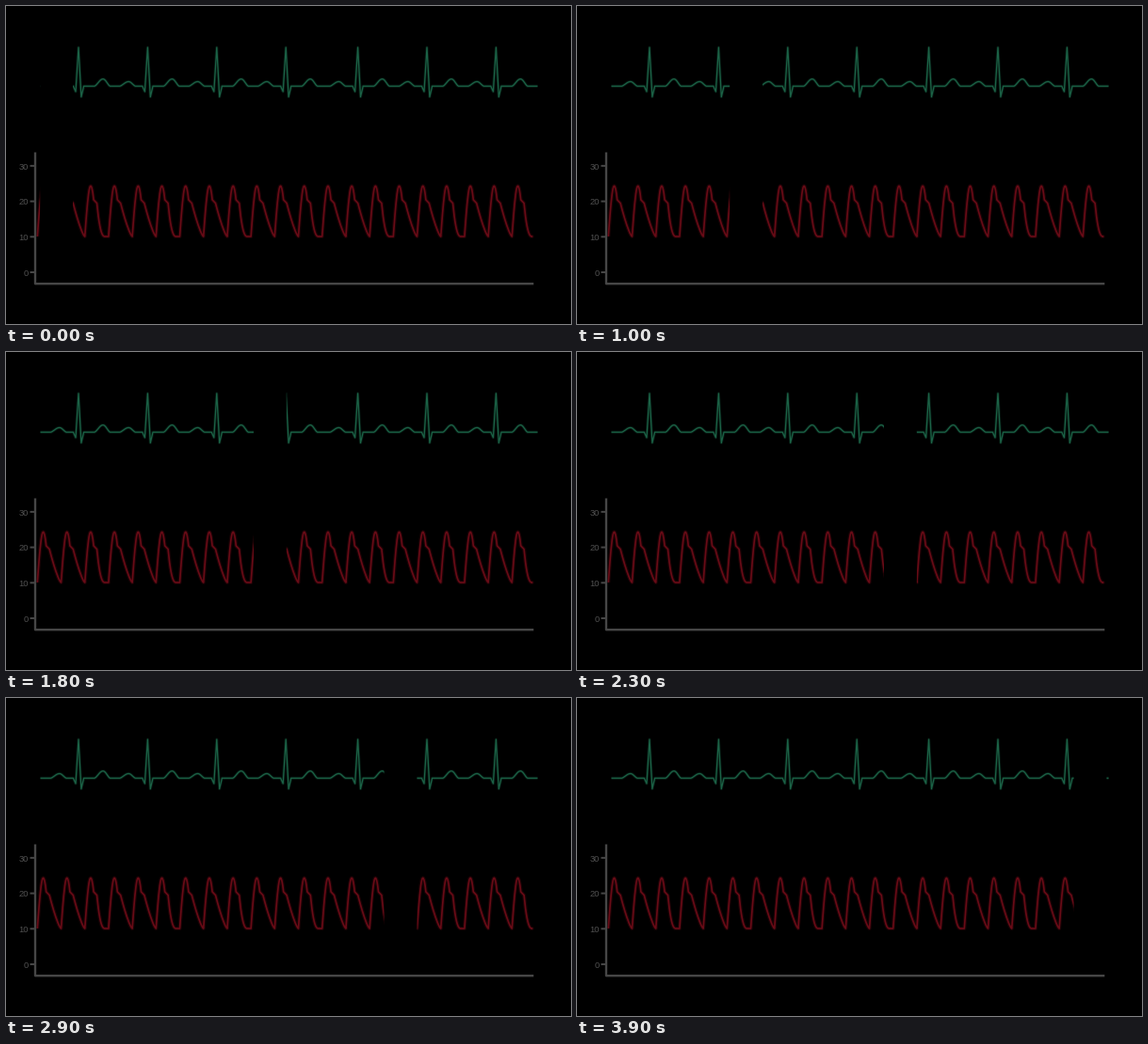
These frames come from a looping animation (600x338 px, 4 s). A matplotlib script:

```python
import numpy as np
import matplotlib.pyplot as plt
from matplotlib.animation import FuncAnimation
from matplotlib.patches import Rectangle

W, H, DPI = 600, 338, 100
PX = 72 / DPI
FRAMES, INTERVAL = 40, 100
GAP_START, GAP_STEP, GAP_WIDTH = 36.2, 12.6, 34.8

GREEN, RED, GREY, LABEL = "#1b6246", "#680b16", "#464646", "#505050"

ECG_BASE, ECG_START, ECG_END = 85.2, 36.5, 564.5
FOOT, TOP, NOTCH = 245, 191.3, 206
BEAT, BEATS, PRESSURE_END = 25.2, 21, 558.5


def wave(start, peak, end, height):
    """Rounded ECG wave that may rise and fall at different rates."""
    u = np.linspace(-1, 1, 17)
    x = peak + u * np.where(u < 0, peak - start, end - peak)
    y = ECG_BASE - height * np.cos(u * np.pi / 2) ** 1.5
    return np.column_stack([x, y])


def ecg_trace():
    parts = [[(ECG_START, ECG_BASE)]]
    for k in range(7):
        r = 77 + 73.4 * k + (3 if k > 3 else 0)  # one longer pause
        qrs = [(r - 5.6, ECG_BASE), (r - 3, 91), (r, 44),
               (r + 2.9, 96.6), (r + 5.6, ECG_BASE)]
        parts += [wave(r - 29.5, r - 20.2, r - 13, 4.8), qrs,
                  wave(r + 17, r + 26, r + 33.5, 7.6)]
    parts.append([(ECG_END, ECG_BASE)])
    return np.vstack(parts).T


def pressure_beat(fall_time, power):
    """Upstroke, drop to the notch, short shoulder, then decay to the foot."""
    u = np.linspace(0, 1, 12)
    rise = (-6.2 * (1 - u), FOOT - (FOOT - TOP) * np.sin(u * np.pi / 2))
    drop = (3.2 * u, TOP + (NOTCH - TOP) * u ** 2)
    shoulder = NOTCH + 3.6
    decay = (6.6 + fall_time * u,
             FOOT - (FOOT - shoulder) * (1 - u) ** power)
    return np.hstack([rise, drop, decay])


def pressure_trace():
    slow, fast = pressure_beat(12.4, 1.35), pressure_beat(8.6, 2.5)
    beats = [(fast if k % 3 == 2 else slow) + [[39.5 + BEAT * k], [0]]
             for k in range(BEATS)]
    x, y = np.hstack(beats)
    return np.append(x, PRESSURE_END), np.append(y, FOOT)


fig = plt.figure(figsize=(W / DPI, H / DPI), dpi=DPI, facecolor="black")
ax = fig.add_axes([0, 0, 1, 1])
ax.set_xlim(0, W)
ax.set_ylim(H, 0)
ax.axis("off")


def stroke(x, y, color, width, **kw):
    ax.plot(x, y, color=color, lw=width * PX, solid_joinstyle="round",
            solid_capstyle="butt", snap=False, **kw)


def glow(trace, color, width):
    """A thin line over a faint, wider halo."""
    stroke(*trace, color, 2.4 * width, alpha=0.25, zorder=1)
    stroke(*trace, color, width, zorder=2)


glow(ecg_trace(), GREEN, 1.3)
glow(pressure_trace(), RED, 1.7)

stroke([31, 31, 560.3], [155.5, 295.2, 295.2], GREY, 2.4, zorder=4)
for value in range(0, 40, 10):
    y = 283 - 3.77 * value
    stroke([25.5, 31], [y, y], GREY, 2, zorder=4)
    ax.text(24, y + 0.2, str(value), color=LABEL, fontsize=9.4 * PX,
            family="Liberation Sans", ha="right", va="center_baseline")

# The moving gap wipes both traces but leaves the axes visible.
gap = ax.add_patch(Rectangle((GAP_START, 40), GAP_WIDTH, 212,
                             fc="black", ec="none", snap=False, zorder=3))


def draw(i):
    gap.set_x(GAP_START + GAP_STEP * i)
    return (gap,)


def reset():
    return draw(0)


anim = FuncAnimation(fig, draw, frames=FRAMES, init_func=reset,
                     interval=INTERVAL, repeat=True, repeat_delay=0)
plt.show()
```
